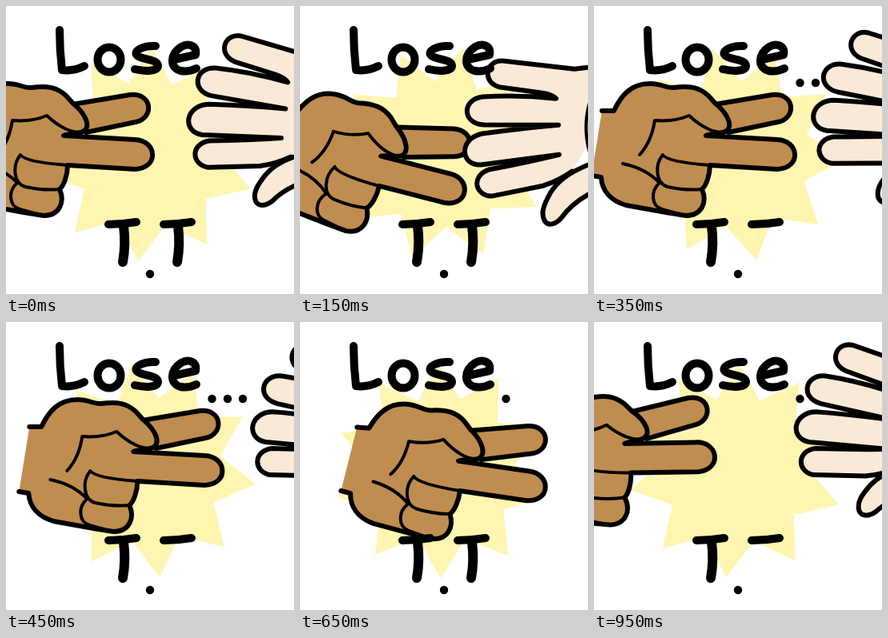
An HTML page that plays this animation: 360x360 px, repeating every 1 s.

```html
<!DOCTYPE html>
<html>
<head>
<meta charset="utf-8">
<style>
html, body { margin: 0; width: 100%; height: 100%; overflow: hidden; background: #fff; }
svg { display: block; width: 100vw; height: 100vh; }
path { stroke-linecap: round; stroke-linejoin: round; }
.hand { stroke: #000; stroke-width: 6; }
.crease { fill: none; stroke-width: 4; }
.ink { fill: none; stroke: #000; stroke-width: 10; }
.stem { stroke-width: 12; }
</style>
</head>
<body>
<svg viewBox="0 0 360 360">
  <polygon id="star" fill="#fef6b0"/>
  <g id="dots">
    <circle cx="257.5" cy="96" r="5.2"/>
    <circle cx="277" cy="96" r="5.2"/>
    <circle cx="296" cy="96" r="5.2"/>
  </g>
  <g id="scissors" class="hand" fill="#c08d50">
    <path d="M165 124 L243 111 C271 108 274 140 250 145 L188 158"/>
    <path d="M30 131 L45 131 C54 112 66 97 90 97 C105 97 110 103 120 102 C140 99 152 102 163 112
      L172 122 C188 135 195 152 184 157 C178 160 168 159 160 162 L249 167 C277 168 280 203 249 204
      L165 199 C165 212 160 225 155 229 C162 245 155 262 135 262 L110 258 L60 249 C40 243 30 230 29 214 L17 212"/>
    <path class="crease" d="M184 157 C172 160 155 152 139 137 Q120 145 96 143 Q92 170 77 186
      M56 197 Q85 203 102 221 M165 199 Q112 195 106 186 C95 200 98 222 112 226 Q135 231 155 229
      M102 221 C90 232 92 250 105 254 L130 261"/>
  </g>
  <g id="paper" class="hand" fill="#fae9d7">
    <path d="M420 76 L362 81 L345 83 L255 73 C234 72 228 100 252 106 L305 113 Q318 115 322 120
      Q275 115 230 118 C204 121 204 152 232 153 L325 153 Q280 157 230 164 C200 170 202 204 228 203
      L326 190 Q285 200 238 209 C215 217 221 242 242 242 L306 229 Q325 223 342 211
      M364 202 Q328 216 315 238 C306 254 303 264 308 273 C313 280 322 277 329 269 Q341 252 362 240 L420 230"/>
    <path class="crease" d="M366 118 Q353 155 366 194"/>
  </g>
  <path class="ink" d="M67 30 Q67 55 70 80 Q84 82 98 75"/>
  <ellipse class="ink" cx="129" cy="67" rx="14.5" ry="15.5"/>
  <path class="ink" d="M187 50 C172 49 158 56 164 62 C172 68 190 66 190 75 C189 82 174 82 161 79
    M210 67 L237 61 C239 49 228 46 219 51 C205 60 204 77 218 81 Q228 83 238 78"/>
  <path class="ink" d="M128 273 Q145 273 163 270 M197 273 Q214 273 232 270"/>
  <path id="stemA" class="ink stem" d="M147 275 Q150 298 146 320"/>
  <path id="stemB" class="ink stem" d="M215 275 Q218 298 214 320"/>
  <circle cx="180" cy="335" r="5.2"/>
</svg>
<script>
const $ = id => document.getElementById(id);
const TAU = 2 * Math.PI;
const show = (el, on) => el.style.display = on ? '' : 'none';
const bump = d => Math.abs(d) < 2 ? Math.cos(d * TAU / 8) ** 2 : 0;

// Moves the pivot (px, py) to (x, y) and turns the hand around it.
function place(id, x, y, deg, px, py) {
  $(id).setAttribute('transform', `translate(${x} ${y}) rotate(${deg}) translate(${-px} ${-py})`);
}

function drawScissors(n, m) {
  const tilt = 11 * bump(n - 3) + 5 * bump(n - 13) - 5 * bump(n - 18.5);
  place('scissors', 70 + Math.min(33.7 * m, 9.7 * m), 162 + 2.3 * tilt, tilt, 158, 162);
}

function drawPaper(m) {
  const dip = 28 * Math.cos((m - 3.3) * TAU / 10);
  place('paper', Math.max(227 - 24.5 * m, 154 + 17 * m), 157 + dip, 0.24 * (28 - dip), 207, 189);
}

// Ten uneven spikes that ease on by one spike per loop.
function drawStar(u) {
  const turn = 57.5 / 360 + (1 - (1 - u) ** 2) / 10;
  const points = [];
  for (let i = 0; i < 20; i++) {
    const even = (turn + i / 20) * TAU;
    const a = even + 0.07 * Math.sin(even - 1.1);
    const r = i % 2 ? 91 : 135;
    points.push([178 + r * Math.cos(a), 185 + r * Math.sin(a)]);
  }
  $('star').setAttribute('points', points.join(' '));
}

function drawSigns(p) {
  show($('stemA'), p < 4 || p > 6);
  show($('stemB'), p < 4);
  const count = p > 2 && p < 7 ? 1 : p === 7 || p === 8 ? 2 : 3;
  [...$('dots').children].forEach((dot, i) => show(dot, i < count));
}

function draw(ms) {
  const n = Math.floor(ms / 50) % 20;
  const m = n > 13 ? n - 20 : n; // steps before or after the meeting
  drawScissors(n, m);
  drawPaper(m);
  drawStar(n / 20);
  drawSigns(n % 10);
}

const start = performance.now();
function tick() {
  draw(performance.now() - start);
  requestAnimationFrame(tick);
}
tick();
</script>
</body>
</html>
```
